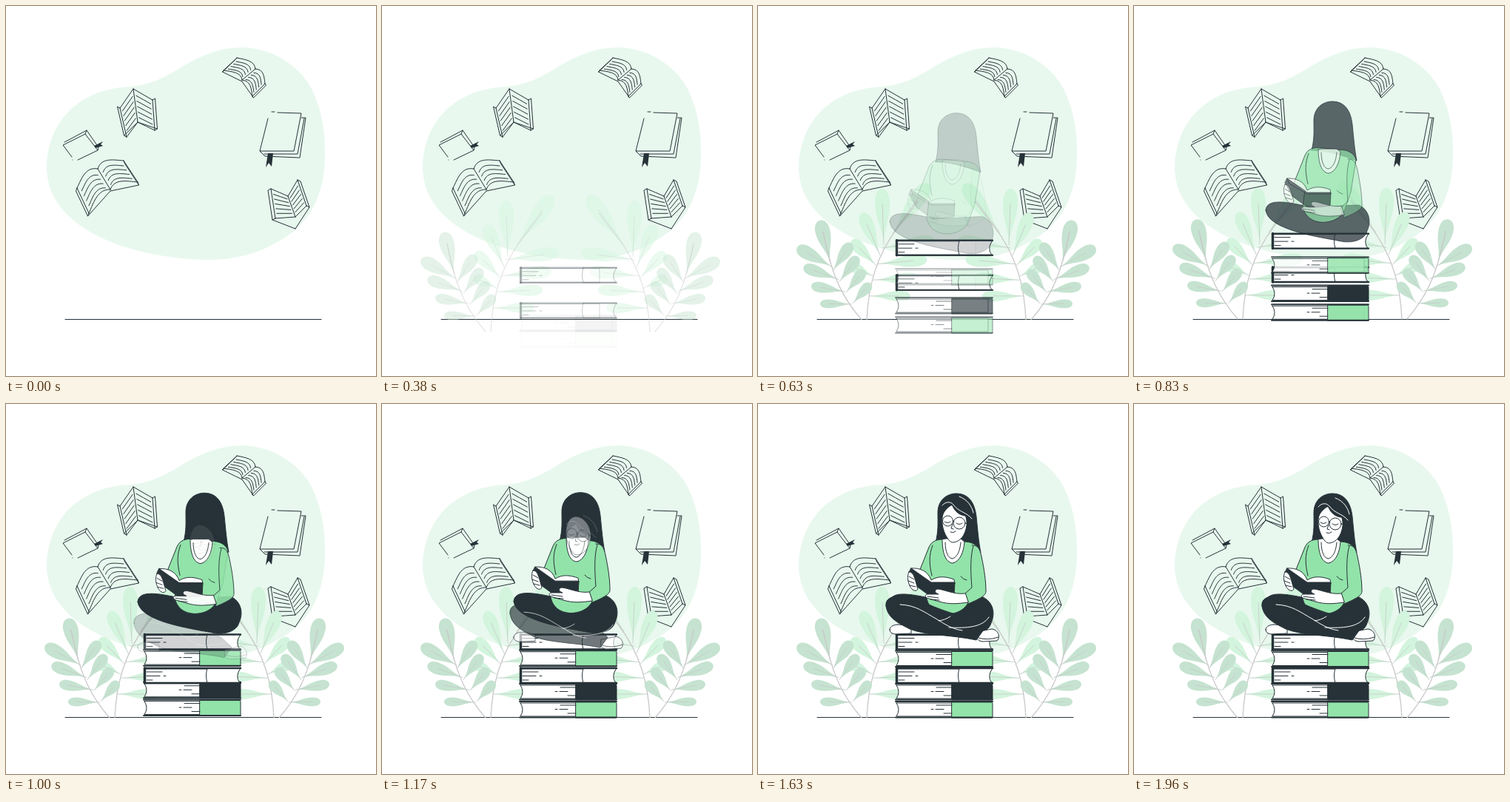
Recreate the animation shown at these times as an HTML page. Size 500 by 500 pixels, loop 2000 ms.

```html
<!DOCTYPE html>
<html lang="en">
<head>
<meta charset="utf-8">
<title>Reading on a pile of books</title>
<style>
html, body { margin: 0; width: 100%; height: 100%; overflow: hidden; background: #fff; }
svg { display: block; width: 100vw; height: 100vh; }
</style>
</head>
<body>
<svg id="stage" viewBox="0 0 500 500" fill="none" stroke-linecap="round" stroke-linejoin="round"></svg>
<script>
const INK = '#263238', GREEN = '#92e3a9', WHITE = '#fff';

const path = (d, fill = 'none', stroke = INK, width = 1) =>
  `<path d="${d}" fill="${fill}" stroke="${stroke}" stroke-width="${width}"/>`;
const shape = (d, fill) => path(d, fill, 'none');
const mix = (a, b, k) => a + (b - a) * k;
const mixPt = (p, q, k) => [mix(p[0], q[0], k), mix(p[1], q[1], k)];
const add = (p, q, k = 1) => [p[0] + q[0] * k, p[1] + q[1] * k];
const fmt = pts => pts.map(p => p.map(v => v.toFixed(1)).join(' ')).join(' ');
const line = (...pts) => 'M' + fmt(pts);
const cubic = pts => `M${fmt(pts.slice(0, 1))}C${fmt(pts.slice(1))}`;

// Open book: a spine and two outer edges (top, bottom); pages swell near the spine
function openBook(spine, left, right, cover, depth, bulge, rows) {
  const up = add(spine[0], spine[1], -1);
  const edge = (outer, i) => [outer[i],
    add(mixPt(outer[i], spine[i], 1 / 3), up, .17 * bulge),
    add(mixPt(outer[i], spine[i], 2 / 3), up, .42 * bulge), spine[i]];
  const base = add(spine[1], [0, depth]);
  let d = line(...spine);
  for (const [outer, side] of [[left, -1], [right, 1]]) {
    const out = outer.map(p => add(p, [cover[0] * side, cover[1]]));
    const top = edge(outer, 0), bottom = edge(outer, 1);
    d += cubic(top) + cubic(bottom) + line(...outer) +
      line(outer[0], out[0], out[1], outer[1]) + line(out[1], base);
    for (let i = 1; i <= rows; i++) {
      const row = top.map((p, j) => mixPt(p, bottom[j], i / (rows + 1)));
      const mid = mixPt(row[0], row[3], .5);
      d += cubic(row.map(p => mixPt(mid, p, .78)));
    }
  }
  return path(d);
}

const floating =
  openBook([[172, 112], [178, 157]], [[154, 138], [163, 177]], [[198, 127], [201, 168]], [3.5, -2], 0, 0, 5) +
  openBook([[381, 257], [391, 285]], [[358, 247], [364, 287]], [[394, 235], [406, 270]], [4, 2], 16, 0, 5) +
  openBook([[124, 220], [141, 248]], [[96, 246], [112, 280]], [[159, 209], [178, 238]], [1.5, 4], 2, 1, 4) +
  openBook([[337, 85], [319, 100]], [[312, 70], [294, 87]], [[350, 105], [333, 122]], [1.5, 2], 2, 1, 4) +
  path('M89 204L77 188L107 173L124 195L97 208M79 184L109 168L125 191L124 195M107 173L109 168M90 208V208') +
  shape('M119 189L131 183L128 187L131 189L121 192Z', INK) +
  path('M359 143H363M367 144L399 145L389 196H343L354 152M399 151H405L397 205L350 203L343 196M403 152L394 200H349') +
  shape('M354 199H361L359 217L355 212L351 218Z', INK);

const blob = shape('M168 109C195 107 215 96 240 81C265 66 290 56 320 56C360 57 395 80 412 110C426 138 431 165 431 200C431 245 418 280 388 305C352 332 315 343 273 343C165 341 55 300 55 218C56 160 95 112 168 109Z', '#e8f8ee');

// Plants
function leaf([x, y], angle, length, half, fill) {
  const a = angle * Math.PI / 180, c = Math.cos(a), s = Math.sin(a);
  const at = (u, v) => [x + c * u * length - s * v * half, y + s * u * length + c * v * half];
  const side = k => cubic([at(0, 0), at(.3, .1 * k), at(.45, k), at(.75, k)]) +
    'C' + fmt([at(.92, k), at(1, .5 * k), at(1, 0)]) + 'Z';
  return shape(side(1) + side(-1), fill) + path(line(at(0, 0), at(.72, 0)), 'none', '#c6cbc8', .8);
}
// Four leaves down a stem, each setting running from its first value to its last
function spray(from, to, angle, length, half, fill) {
  let out = '';
  for (let i = 0; i < 4; i++) {
    const pick = r => mix(r[0], r[1], i / 3);
    out += leaf(mixPt(from, to, i / 3), pick(angle), pick(length), pick(half), fill);
  }
  return out;
}
const stem = d => path(d, 'none', '#c9c9c9', 1.3);
const PALE = '#d3f4dd', SAGE = '#c5e3d0';
const halfGarden =
  leaf([182, 307], -54, 82, 11, PALE) +
  spray([170, 323], [155, 365], [-92, -155], [76, 34], [10, 7], PALE) +
  spray([168, 327], [150, 392], [-8, 0], [72, 56], [9, 7], PALE) +
  stem('M147 424C149 380 159 338 190 298L216 264') +
  leaf([98, 347], -104, 59, 10, SAGE) +
  spray([101, 353], [126, 403], [-151, -179], [55, 42], [9, 6], SAGE) +
  spray([101, 358], [128, 402], [-56, -48], [45, 36], [8, 7], SAGE) +
  stem('M140 424C118 399 100 370 88 305');
const garden = halfGarden + `<g transform="translate(509) scale(-1 1)">${halfGarden}</g>`;

// Pile
const at = (y, body) => `<g transform="translate(0 ${y})">${body}</g>`;
const spined = (y, fill) => at(y,
  path('M187 3H311V21H187Q193 12 187 3Z', WHITE) +
  path('M262 2H316Q317 2 317 4V21Q317 23 316 23H262Z', fill) +
  path('M186 1H317M186 22.5H317', 'none', INK, 2) +
  path('M241 6H262M234 11.5H237M240 11.5H251M251 17H262'));
const openEdge = y => at(y,
  path('M188 2H294V21H188Z', WHITE) +
  path('M272 1H317Q309 12 316 21H272Q269 11 272 1Z', WHITE) +
  path('M187.5 1V21', 'none', INK, 3.5) +
  path('M187 1H317M187 21H317', 'none', INK, 2.4) +
  path('M190 6H211M190 11.5H208M213 11.5H216M190 17H198'));

// Reader
const hair = path('M240 187C244 172 243 160 243 147C243 130 255 121 268 121C285 121 293 134 295 152C297 172 298 185 301 201C285 195 262 187 240 187Z', INK);
const backLeg = path('M178 268C179 253 202 256 226 261C250 266 280 261 304 261C318 268 321 283 315 296C312 308 295 313 280 310C250 304 181 295 178 268Z', INK);
const torso =
  path('M249 183C239 183 233 187 230 196L216 231L231 240L228 263C231 276 240 283 254 284C272 284 284 275 287 260L293 243L300 199C297 190 289 186 278 186Z', GREEN) +
  path('M236 191C231 204 231 215 235 232');
const collar = path('M249 183C249 200 253 214 263 215C273 213 278 200 279 186L274 182H254Z', WHITE) +
  path('M253 187C253 200 257 209 263 209C269 207 273 199 274 187');
const sleeve = path('M289 191C297 190 300 196 302 206C306 225 308 240 308 253C308 258 303 262 284 270L279 257L289 248C287 225 287 205 291 192', GREEN) +
  path('M274 233Q277 237 282 238');
const novel =
  path('M207 222C219 221 230 226 234 238C245 231 256 234 265 237L266 243H234L210 229Z', WHITE) +
  path('M207 222L234 241H266L265 259L236 262L214 246L204 228Z', INK);
const hands =
  path('M204 227C201 231 202 245 209 251Q214 254 216 250L212 236Q209 226 204 227Z', WHITE) +
  path('M204 233L211 237M203 239L211 242M205 245L213 247') +
  path('M280 256C266 258 253 251 243 250C238 251 238 255 244 257H229C224 258 226 262 231 263L245 267C258 271 270 270 284 268Z', WHITE) +
  path('M229 260L244 262M233 264L245 265');
const frontLeg =
  path('M178 305C178 297 193 296 207 302V310L185 311Q178 310 178 305Z', WHITE) +
  path('M296 308L316 304C325 305 328 315 323 320L303 321Q293 320 296 308Z', WHITE) +
  path('M298 316Q310 320 325 315') +
  path('M173 273C171 259 190 257 212 261C232 274 262 283 290 291L305 305L295 319C262 312 228 313 205 304C187 295 175 288 173 273Z', INK) +
  path('M192 271C214 272 224 281 242 291C252 297 261 304 276 306M312 288C303 302 282 303 258 302M244 293Q253 292 260 287', 'none', WHITE);
const face =
  path('M252 143C247 152 248 166 253 177C257 184 259 188 264 188C273 187 280 179 282 165C284 141 260 127 252 143Z', WHITE) +
  '<g stroke="#263238"><circle cx="256.5" cy="159" r="7"/><circle cx="272" cy="162" r="8"/></g>' +
  path('M263.5 159L265 160M280 162L285 163M252 160Q256 163 260 160M268 162Q272 165 276 162M263 163L261 169L264 170M260 174Q264 176 267 173');
const fringe =
  shape('M246 151C245 132 260 122 270 125C284 128 292 144 290 166C288 161 286 157 282 154C271 153 265 146 262 139C254 143 250 149 249 158Z', INK) +
  path('M249 139C253 134 260 133 264 138C271 148 282 148 289 157M272 127C283 131 289 140 291 149', 'none', WHITE);

// Entrances: start in ms, distance, drawing
const SPAN = 790;
const parts = [
  [90, 30, garden],
  [320, 38, spined(401, GREEN)],
  [285, 42, spined(377, INK)],
  [170, 60, openEdge(356)],
  [410, 30, spined(332.5, GREEN)],
  [155, 60, openEdge(310.5)],
  [440, 30, hair],
  [440, 30, backLeg],
  [445, 30, torso],
  [480, 30, collar],
  [540, 30, sleeve],
  [480, 30, novel],
  [520, 30, hands],
  [810, 30, frontLeg],
  [880, 30, face],
  [980, 30, fringe]
];

const stage = document.getElementById('stage');
stage.innerHTML = blob + floating + path('M80 423.5H426') +
  parts.map(p => `<g class="part">${p[2]}</g>`).join('');
const nodes = stage.querySelectorAll('.part');

// cubic-bezier(.36, -.01, .5, 1.38): rises a little past its goal
const bezier = (a, b, u) => 3 * (1 - u) ** 2 * u * a + 3 * (1 - u) * u * u * b + u ** 3;
function ease(x) {
  if (x <= 0) return 0;
  if (x >= 1) return 1;
  let lo = 0, hi = 1;
  for (let i = 0; i < 20; i++) {
    const mid = (lo + hi) / 2;
    if (bezier(.36, .5, mid) < x) lo = mid; else hi = mid;
  }
  return bezier(-.01, 1.38, lo);
}

function draw() {
  const t = performance.now() % 2000;
  parts.forEach(([start, rise], i) => {
    const y = t < 210 ? 0 : ease((t - start) / SPAN);
    const alpha = Math.max(0, Math.min(1, y));
    // Each shape fades on its own, so lower ones show through
    nodes[i].setAttribute('fill-opacity', alpha);
    nodes[i].setAttribute('stroke-opacity', alpha);
    nodes[i].setAttribute('transform', `translate(0 ${(rise * (1 - y)).toFixed(2)})`);
  });
  requestAnimationFrame(draw);
}
draw();
</script>
</body>
</html>
```
